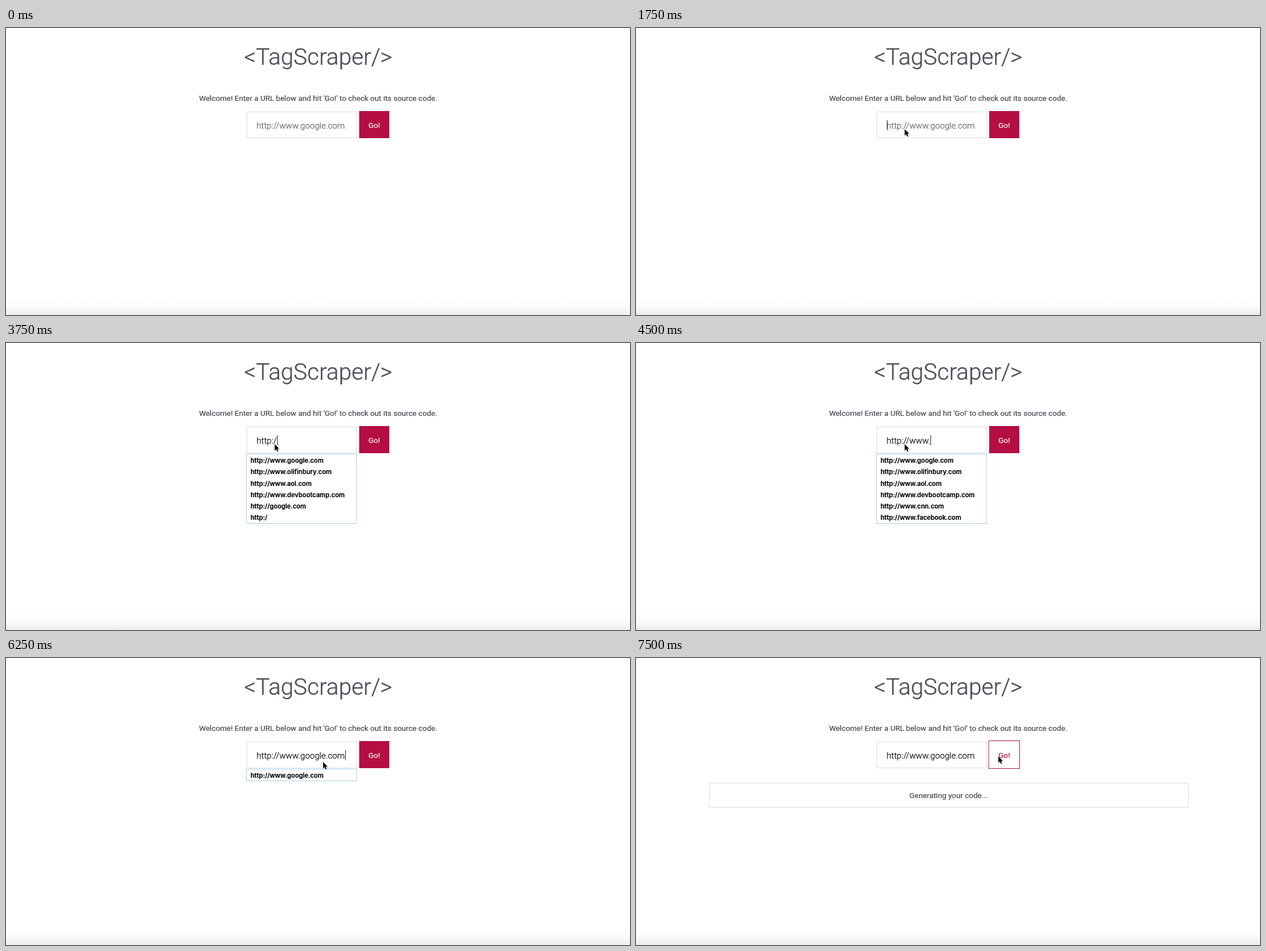
These frames come from a looping animation (1102 by 508 pixels, 8000 ms). An HTML page:

```html
<!DOCTYPE html>
<html lang="en">
<head>
<meta charset="utf-8">
<title>TagScraper</title>
<style>
  html, body { margin: 0; width: 100%; height: 100%; overflow: hidden; background: #fff; }
  svg { display: block; width: 1102px; height: 508px; }
  text {
    font-family: Roboto, sans-serif; font-size: 13.53px; white-space: pre;
    color: #434651; fill: currentColor; stroke: currentColor; stroke-width: .2px;
  }
  .mid { text-anchor: middle; }
  #title { font-size: 40.7px; font-weight: 300; color: #4b4f5b; stroke-width: .4px; }
  #field { font-size: 15.2px; font-weight: 300; stroke-width: .3px; }
  #list text { font: 600 11.2px Inter, sans-serif; color: #000; }
  .frame { fill: #fff; stroke: #dcdcdc; }
</style>
</head>
<body>
<svg viewBox="0 0 1102 508">
  <defs>
    <linearGradient id="shade" x1="0" y1="0" x2="0" y2="1">
      <stop offset="0" stop-color="#fff"/>
      <stop offset=".55" stop-color="#fbfbfb"/>
      <stop offset="1" stop-color="#ededed"/>
    </linearGradient>
  </defs>
  <rect y="474" width="1102" height="34" fill="url(#shade)"/>
  <rect id="topShade" x="617" width="298" height="2" fill="#f8f8f8"/>

  <text id="title" class="mid" x="551.4" y="65">&lt;TagScraper/&gt;</text>
  <text class="mid" x="551.2" y="129.3">Welcome! Enter a URL below and hit 'Go!' to check out its source code.</text>

  <rect class="frame" x="425.5" y="148.5" width="194" height="46"/>
  <text id="field" x="442.5" y="177.7"></text>
  <rect id="caret" y="163" width="1" height="18" fill="#222"/>

  <rect id="button"/>
  <text id="label" class="mid" x="650.2" y="176.8">Go!</text>

  <g id="list">
    <rect id="listBox" x="424.5" y="196.5" width="194.5" fill="#fff" stroke="#a9cbec"/>
  </g>

  <g id="result">
    <rect class="frame" x="129.5" y="221.5" width="846" height="43"/>
    <text class="mid" x="552" y="247.8">Generating your code...</text>
  </g>

  <g id="pointer">
    <path d="M0 0V11.4L2.6 9 4.3 13 6.3 12.2 4.6 8.2H8Z" fill="#000" opacity=".18"
      transform="translate(.6 1.2)" stroke="#000" stroke-width="1.4"/>
    <path d="M0 0V11.4L2.6 9 4.3 13 6.3 12.2 4.6 8.2H8Z" fill="#000" stroke="#fff"
      stroke-width="1.6" paint-order="stroke" stroke-linejoin="round"/>
  </g>
</svg>
<script>
const LOOP = 8000;
const ROW = 20.25;
const URL_TEXT = "http://www.google.com";
const $ = id => document.getElementById(id);

const site = name => `http://${name}.com`;
const common = ["www.google", "www.olifinbury", "www.aol", "www.devbootcamp"].map(site);
const bare = site("google");
const lists = {
  none: [],
  start: [...common, "htt", bare],
  scheme: [...common, bare, "http:/"],
  slashes: [...common, bare, site("www.cnn")],
  www: [...common, site("www.cnn"), site("www.facebook")],
  match: [URL_TEXT]
};

// Each track holds [start time, value] pairs; the value stays until the next pair.
const tracks = {
  pointer: [[0, null], [250, [780, 60]], [500, [640, 150]], [750, [530, 189]],
    [1000, [502, 183]], [1500, [474.5, 179]], [6250, [560, 184]], [6500, [618, 178]],
    [6750, [640, 174]]],
  typed: [[0, 0], [2250, 1], [2500, 2], [2750, 4], [3500, 5], [3750, 6], [4000, 7],
    [4250, 8], [4500, 11], [4750, 13], [5000, 15], [5250, 17], [5500, 19], [5750, 21]],
  caret: [[0, false], [1750, true], [3250, false], [3500, true], [6500, false]],
  list: [[0, "none"], [2250, "start"], [2750, "scheme"], [4000, "slashes"],
    [4500, "www"], [4750, "match"], [6500, "none"]],
  button: [[0, "idle"], [6750, "fading"], [7000, "hover"]]
};

const idleBox = { x: 623.7, y: 147, width: 53.3, height: 48 };
const hoverBox = { x: 623, y: 146.5, width: 54.5, height: 49 };
const buttonLooks = {
  idle: { box: idleBox, fill: "#b40e42", stroke: "none", label: "#fff" },
  fading: { box: hoverBox, fill: "#f1d0da", stroke: "#c03d69", label: "#c64470" },
  hover: { box: hoverBox, fill: "#fff", stroke: "#b40e42", label: "#b40e42" }
};

const at = (track, t) => track.findLast(([start]) => start <= t)[1];
const set = (el, attrs) => {
  for (const key in attrs) el.setAttribute(key, attrs[key]);
};
const show = (el, on) => set(el, { visibility: on ? "visible" : "hidden" });

const rows = Array.from({ length: 6 }, (_, i) => {
  const row = document.createElementNS("http://www.w3.org/2000/svg", "text");
  set(row, { x: 432, y: 212.2 + i * ROW });
  $("list").append(row);
  return row;
});

function drawField(t) {
  const count = at(tracks.typed, t);
  const field = $("field");
  field.textContent = URL_TEXT.slice(0, count || URL_TEXT.length);
  field.style.color = count ? "#16191f" : "#6b6d70";
  const end = count ? field.getComputedTextLength() : 0;
  set($("caret"), { x: Math.round(443 + end) });
  show($("caret"), at(tracks.caret, t));
}

function drawList(t) {
  const items = lists[at(tracks.list, t)];
  show($("list"), items.length);
  set($("listBox"), { height: Math.round(1 + items.length * ROW) });
  rows.forEach((row, i) => { row.textContent = items[i] || ""; });
}

function drawButton(t) {
  const { box, fill, stroke, label } = buttonLooks[at(tracks.button, t)];
  set($("button"), { ...box, fill, stroke });
  $("label").style.color = label;
}

function drawPointer(t) {
  const spot = at(tracks.pointer, t);
  show($("pointer"), spot);
  if (spot) set($("pointer"), { transform: `translate(${spot})` });
}

function render(t) {
  show($("topShade"), t < 250);
  show($("result"), t >= 7000);
  drawField(t);
  drawList(t);
  drawButton(t);
  drawPointer(t);
}

const begin = performance.now();
function tick() {
  render((performance.now() - begin) % LOOP);
  requestAnimationFrame(tick);
}
tick();
</script>
</body>
</html>
```
